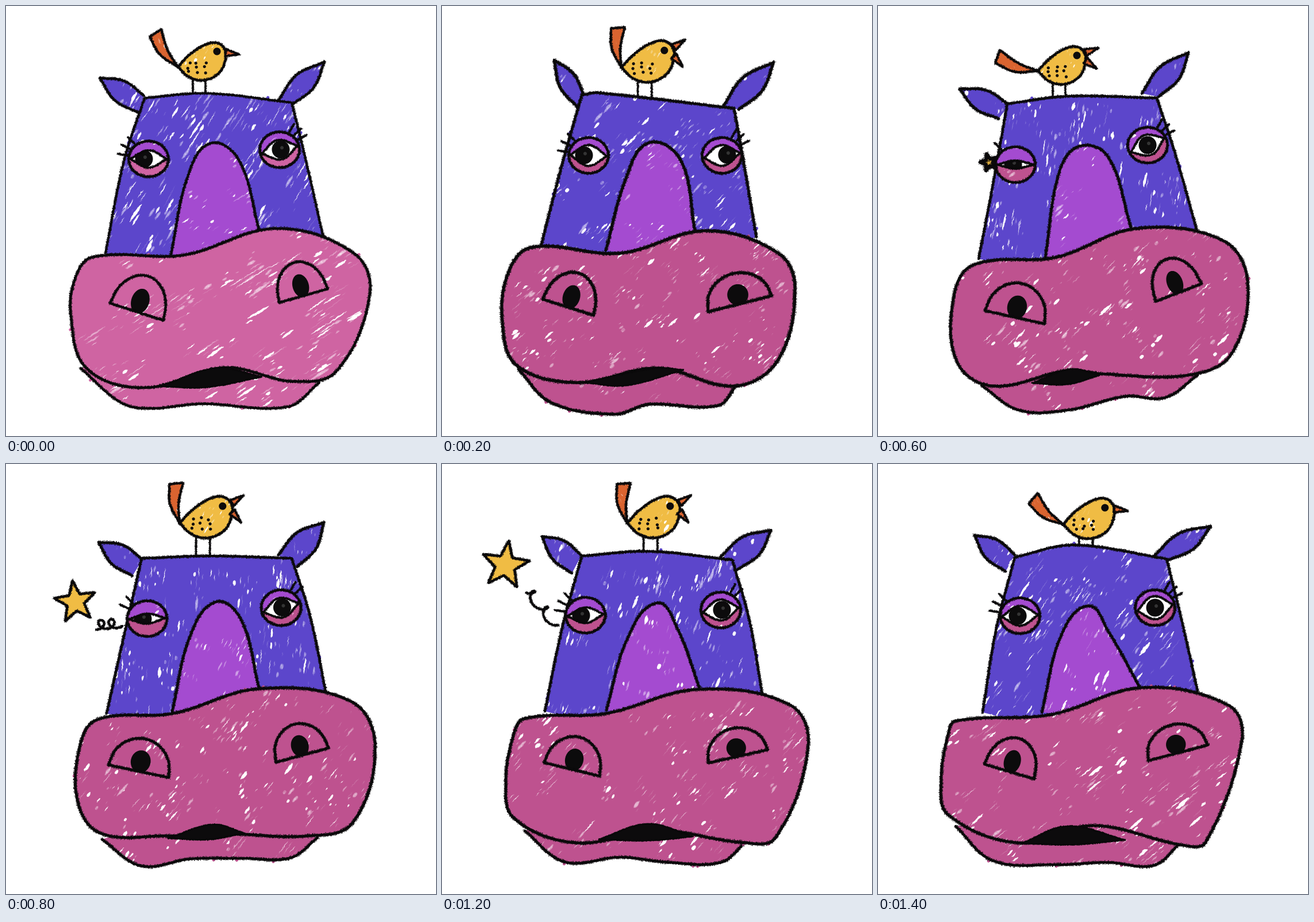
An HTML page with a canvas for the animation above (1.6 s loop, 748 by 748 pixels).

```html
<!DOCTYPE html>
<html lang="en">
<head>
<meta charset="utf-8">
<title>Crayon hippo</title>
<style>
html, body { margin: 0; width: 100%; height: 100%; overflow: hidden; background: #fff; }
canvas { display: block; width: 100vw; height: 100vh; }
</style>
</head>
<body>
<canvas id="stage" width="748" height="748"></canvas>
<script>
const SIZE = 748, STEP = 200, TAU = 2 * Math.PI, RAD = Math.PI / 180;
const INK = '#0c0b0c', BLUE = '#5c46cb', PURPLE = '#a44bd0', PINK = '#be528f';
const YELLOW = '#f0bc44', ORANGE = '#da6430';

// Outlines are key points of a smooth curve; a star marks a corner.
// ears: base, tip, base; nostrils: base ends, height
// eyes: centre, tilt, opening, look, lashes
// bird: tail root, scale, tail tip from root, gape in degrees
// angles: hatching of head, nose and muzzle
const calm = {
  pink: '#cf64a2', width: 5, angles: [-58, -35, -33], streak: 36,
  head: '173,430 205,270 241,160* 350,152 497,168* 522,270 556,420',
  nose: '287,432 315,300 355,239 405,268 440,388',
  muzzle: '150,437 310,433 470,387 605,430 633,500 575,635 500,653 380,629 240,664 140,630 113,540 120,475',
  jaw: '130,630 200,690 250,700 340,692 490,697 545,655',
  mouth: '270,662* 365,630 445,645* 350,663',
  ears: [[232, 186, 163, 125, 240, 156], [474, 164, 554, 97, 497, 172]],
  nostrils: [[181, 517, 274, 547, 65], [475, 516, 560, 492, 60]],
  eyes: [[248, 266, 0, 15, -8, 3], [476, 250, -12, 17, 2, 3]],
  bird: [299, 106, 1, -39, -59, 0]
};
const chirp = {
  width: 6, angles: [-48, -42, -42], streak: 20,
  head: '172,418 205,290 243,155* 270,151 508,178* 521,250 547,402',
  nose: '285,425 320,300 360,238 415,268 440,390',
  muzzle: '155,420 310,430 460,391 585,430 614,490 585,615 510,661 375,630 235,655 130,625 105,550 115,465',
  jaw: '133,632 190,690 300,710 360,693 480,695 512,660',
  mouth: '248,655* 370,630 420,633* 320,660',
  ears: [[238, 178, 195, 94, 247, 156], [489, 175, 577, 98, 516, 180]],
  nostrils: [[175, 510, 264, 538, 62], [463, 532, 574, 504, 54]],
  eyes: [[255, 260, 2, 18, -8, 3], [487, 260, -8, 18, 9, 3]],
  bird: [312, 107, 1.1, -6, -69, 42]
};
const wink = {
  width: 5.5, angles: [-80, -45, -45], streak: 22,
  head: '175,440 200,310 225,170* 330,157 485,160* 518,260 556,395',
  nose: '291,437 315,290 350,244 400,262 440,385',
  muzzle: '165,451 310,437 450,387 600,408 643,480 615,605 540,642 390,640 330,634 200,661 138,620 131,510',
  jaw: '180,660 245,703 330,703 430,679 500,681 556,642',
  mouth: '268,656* 335,632 386,642* 330,658',
  ears: [[210, 196, 142, 144, 228, 172], [459, 152, 540, 81, 488, 158]],
  nostrils: [[186, 530, 290, 553, 60], [483, 514, 563, 483, 62]],
  eyes: [[239, 276, 0, 7, -4, 1], [469, 242, -23, 18, 0, 3]],
  bird: [278, 113, 1, -70, -25, 28]
};
const fly = {
  width: 5.5, angles: [-88, -85, -58], streak: 20,
  head: '175,428 210,290 247,158* 380,163 508,168* 540,270 558,405',
  nose: '287,424 325,310 380,236 418,280 440,392',
  muzzle: '150,438 270,431 430,394 600,418 640,500 590,642 510,652 370,645 220,659 128,622 112,555 125,475',
  jaw: '153,645 225,694 310,671 390,692 490,688 528,658',
  mouth: '295,645* 385,622 442,642* 380,648',
  ears: [[230, 193, 180, 128, 247, 160], [488, 165, 566, 122, 525, 200]],
  nostrils: [[170, 517, 277, 538, 55], [456, 524, 560, 505, 49]],
  eyes: [[252, 262, -4, 10, -11, 3], [488, 258, -6, 16, 4, 0]],
  bird: [335, 117, .97, -39, -37, 33]
};
const rest = {
  width: 5.5, angles: [-55, -65, -40], streak: 28,
  head: '182,432 205,290 238,162* 340,141 502,165* 529,275 556,395',
  nose: '285,432 318,300 365,247 400,290 455,388',
  muzzle: '135,447 300,436 460,389 610,420 633,480 570,658 530,663 375,629 245,659 122,610 110,550 122,470',
  jaw: '135,630 200,690 310,697 400,693 480,698 525,660',
  mouth: '250,660* 330,630 430,654* 340,662',
  ears: [[222, 187, 168, 124, 238, 158], [480, 160, 579, 108, 502, 168]],
  nostrils: [[185, 522, 272, 548, 60], [470, 516, 574, 489, 50]],
  eyes: [[247, 264, -3, 17, -4, 3], [482, 250, -10, 20, 0, 3]],
  bird: [322, 105, 1.07, -52, -45, 0]
};

// Blends numbers, point strings, lists and whole poses.
function mix(a, b, t) {
  if (typeof a === 'number') return a + (b - a) * t;
  if (typeof a === 'string') {
    const nums = b.match(/\d+/g);
    let i = 0;
    return a.replace(/\d+/g, n => Math.round(mix(+n, +nums[i++], t)));
  }
  if (Array.isArray(a)) return a.map((v, i) => mix(v, b[i], t));
  return Object.fromEntries(Object.keys(a).map(k => [k, mix(a[k], b[k], t)]));
}
const hop = (a, b, dx) => {
  const pose = mix(a, b, .5), [, , ...shape] = chirp.bird;
  return { ...pose, bird: [chirp.bird[0] + dx, 103, ...shape] };
};

let g, seed;
function rnd() {
  seed = (seed + 0x6D2B79F5) | 0;
  let t = Math.imul(seed ^ (seed >>> 15), 1 | seed);
  t = (t + Math.imul(t ^ (t >>> 7), 61 | t)) ^ t;
  return ((t ^ (t >>> 14)) >>> 0) / 4294967296;
}

const parse = text => text.split(' ').map(s => [...s.replace('*', '').split(',').map(Number), s.endsWith('*')]);
const corner = p => [p[0], p[1], true];

// Local frame on a chord: u runs along it, v to its left, both in chord lengths.
const span = (ax, ay, bx, by) => (u, v) =>
  [ax + u * (bx - ax) + v * (by - ay), ay + u * (by - ay) - v * (bx - ax)];

// Turns key points into a dense polyline.
function curve(keys, closed) {
  if (typeof keys === 'string') keys = parse(keys);
  const p = keys.flatMap(k => k[2] ? [k, k] : [k]);
  const n = p.length, out = [];
  const at = i => closed ? p[(i + n) % n] : p[Math.max(0, Math.min(n - 1, i))];
  const dir = i => {
    const a = at(i - 1), b = at(i + 1), d = Math.hypot(b[0] - a[0], b[1] - a[1]) || 1;
    return [(b[0] - a[0]) / d, (b[1] - a[1]) / d];
  };
  for (let i = 0; i < (closed ? n : n - 1); i++) {
    const a = at(i), b = at(i + 1), len = Math.hypot(b[0] - a[0], b[1] - a[1]);
    if (!len) continue;
    const u = dir(i), v = dir(i + 1), k = len * 1.06, m = Math.ceil(len);
    for (let j = 0; j < m; j++) {
      const t = j / m, q = t * t, c = q * t;
      out.push([0, 1].map(d => (2 * c - 3 * q + 1) * a[d] + (c - 2 * q + t) * k * u[d] +
        (3 * q - 2 * c) * b[d] + (c - q) * k * v[d]));
    }
  }
  out.push(closed ? out[0] : p[n - 1]);
  return out;
}
function ring(cx, cy, rx, ry = rx, turn = 0) {
  const out = [], n = Math.ceil(TAU * Math.max(rx, ry)), c = Math.cos(turn), s = Math.sin(turn);
  for (let i = 0; i <= n; i++) {
    const x = rx * Math.cos(i / n * TAU), y = ry * Math.sin(i / n * TAU);
    out.push([cx + x * c - y * s, cy + x * s + y * c]);
  }
  return out;
}
function trace(pts) {
  g.beginPath();
  pts.forEach(p => g.lineTo(p[0], p[1]));
}
function fill(pts, color) {
  trace(pts);
  g.fillStyle = color;
  g.fill();
}
function inside(pts, draw) {
  g.save();
  trace(pts);
  g.clip();
  draw();
  g.restore();
}

// Wax line: solid core with a grainy rim.
function line(pts, w = 5) {
  trace(pts);
  g.strokeStyle = g.fillStyle = INK;
  g.lineWidth = w * .76;
  g.lineCap = g.lineJoin = 'round';
  g.stroke();
  for (const [x, y] of pts) for (let i = 0; i < 5; i++) {
    const a = rnd() * TAU, r = w * (.3 + rnd() * .36), s = .5 + rnd() * .8;
    g.fillRect(x + r * Math.cos(a) - s / 2, y + r * Math.sin(a) - s / 2, s, s);
  }
}

// Flat colour with bundles of uncoloured paper showing through.
function hatch(pts, color, deg, count, len) {
  fill(pts, color);
  const xs = pts.map(p => p[0]), ys = pts.map(p => p[1]);
  const x0 = Math.min(...xs), y0 = Math.min(...ys);
  const w = Math.max(...xs) - x0, h = Math.max(...ys) - y0;
  inside(pts, () => {
    g.strokeStyle = '#fff';
    g.lineCap = 'round';
    for (let i = 0; i < count; i++) {
      const cx = x0 + rnd() * w, cy = y0 + rnd() * h, n = 1 + 3 * rnd();
      for (let j = 0; j < n; j++) {
        const a = (deg + rnd() * 8 - 4) * RAD, c = Math.cos(a), s = Math.sin(a);
        const off = j * 7 - 8, along = (rnd() - .5) * len;
        const l = len * (.15 + 1.3 * rnd() * rnd()), wide = .8 + 5 * rnd() ** 3;
        const x = cx + along * c - off * s, y = cy + along * s + off * c;
        g.globalAlpha = rnd() < .5 ? .25 : .95;
        for (let d = 0; d < l; d += 2) {
          const e = (rnd() - .5) * 1.6;
          g.lineWidth = wide * (.3 + .7 * Math.sin(Math.PI * d / l)) * (.6 + .6 * rnd());
          g.beginPath();
          g.moveTo(x + d * c - e * s, y + d * s + e * c);
          g.lineTo(x + (d + 2) * c - e * s, y + (d + 2) * s + e * c);
          g.stroke();
        }
      }
    }
  });
}
// A few strokes that slip over the edge.
function slips(pts, color, deg, n) {
  const c = 4 * Math.cos(deg * RAD), s = 4 * Math.sin(deg * RAD);
  g.strokeStyle = color;
  g.lineWidth = 5;
  g.lineCap = 'round';
  while (n--) {
    const [x, y] = pts[Math.floor(rnd() * pts.length)];
    g.beginPath();
    g.moveTo(x - c, y - s);
    g.lineTo(x + c, y + s);
    g.stroke();
  }
}

function drawEar([ax, ay, tx, ty, bx, by], deg, len, w) {
  const up = span(ax, ay, tx, ty), back = span(tx, ty, bx, by);
  const ear = curve([up(0, 0), up(.5, .13), corner([tx, ty]), back(.5, .13), back(1, 0)]);
  hatch(ear, BLUE, deg, 6, len * .6);
  line(ear, w);
}
function drawNostril([ax, ay, bx, by, h], w) {
  const at = span(ax, ay, bx, by), len = Math.hypot(bx - ax, by - ay), keys = [];
  for (let i = 0; i <= 6; i++) {
    const a = i * Math.PI / 6;
    keys.push([...at(.5 - .5 * Math.cos(a), Math.sin(a) * h / len), i % 6 === 0]);
  }
  const rim = curve(keys, true);
  inside(rim, () => fill(ring(...at(.5, .3 * h / len), .16 * len, .34 * h, Math.atan2(by - ay, bx - ax)), INK));
  line(rim, w);
}
function drawEye([cx, cy, tilt, open, look, lashes], side, pink) {
  const dx = 32 * Math.cos(tilt * RAD), dy = 32 * Math.sin(tilt * RAD);
  const at = span(cx - dx, cy - dy, cx + dx, cy + dy), v = open / 64;
  const outer = ring(cx, cy, 34.5, 31);
  const lens = curve([corner(at(0, 0)), at(.5, v), corner(at(1, 0)), at(.5, -v)], true);
  const [px, py] = at(.5 + look / 64, 0);
  hatch(outer, PURPLE, -35, 3, 12);
  inside(outer, () => hatch([at(-.3, 0), at(1.3, 0), at(1.3, -1), at(-.3, -1)], pink, -35, 3, 10));
  fill(lens, '#fff');
  inside(lens, () => {
    fill(ring(px, py, 15.5), INK);
    fill(ring(px + 2, py - 3, 3), '#343434');
  });
  line(lens, 4);
  line(outer, 5);
  for (let i = 0; i < lashes; i++) {
    const a = (side ? 298 + 16 * i : 228 - 19 * i) * RAD, c = Math.cos(a), s = Math.sin(a);
    line(curve([[cx + 36 * c, cy + 35 * s], [cx + 54 * c, cy + 51 * s]]), 4);
  }
}

function drawLegs([x, y, k]) {
  for (const d of [26, 48]) line(curve([[x + d * k, y + 18], [x + d * k, y + 60]]), 3.5);
}
function drawBird([x, y, k, tx, ty, gape]) {
  const at = (u, v) => [x + u * k, y + v * k];
  const tail = span(x, y, x + tx, y + ty), half = 12 / Math.hypot(tx, ty);
  const fan = curve([corner([x, y]), tail(.5, .2), corner(tail(1, half)), corner(tail(1, -half)), tail(.5, -.02)], true);
  hatch(fan, ORANGE, 60, 3, 9);
  line(fan, 4.5);
  const body = curve(parse('0,0* 20,-21 46,-38 68,-42 82,-30 82,-10 71,11 46,23 20,18')
    .map(p => [...at(p[0], p[1]), p[2]]), true);
  hatch(body, YELLOW, -60, 6, 12);
  for (let i = 0; i < 9; i++)
    fill(ring(...at(17 + 14 * (i % 3) + 5 * rnd(), -9 + 8 * Math.floor(i / 3) + 4 * rnd()), 2.6), INK);
  line(body, 5);
  for (const s of gape ? [-1, 1] : [0]) {
    const [bx, by] = at(83, -25 + 7 * s), a = (8 + gape * s) * RAD;
    const beak = span(bx, by, bx + 24 * Math.cos(a), by + 24 * Math.sin(a));
    const tip = curve([[0, .25], [1, 0], [0, -.25]].map(p => corner(beak(...p))), true);
    fill(tip, ORANGE);
    line(tip, 4);
  }
  fill(ring(...at(68, -27), 6.5), INK);
}

// The star pops out of the eye and slows down as it climbs; k counts its steps.
function drawStar(k) {
  const cx = 110 + 83 * .13 ** k, cy = 272 - 32 * k, r = 43 * (1 - .65 * .2 ** k);
  const keys = [];
  for (let i = 0; i < 10; i++) {
    const a = (i * 36 + 8 * (k - 2) - 90) * RAD, d = i % 2 ? r * .42 : r;
    keys.push(corner([cx + d * Math.cos(a), cy + d * Math.sin(a)]));
  }
  if (k) {
    const at = span(cx + 36, cy + 48, 196, 285), curl = [];
    for (let t = 0; t <= 1; t += .02) {
      const [x, y] = at(t, 0), a = 2.2 * TAU * t;
      curl.push([x + 9 * Math.sin(a), y - 8 + 8 * Math.cos(a)]);
    }
    line(curve(curl), 4.5);
  }
  const star = curve(keys, true);
  fill(star, YELLOW);
  line(star, k ? 5 : 8);
}

function paint([p, star], i) {
  const page = document.createElement('canvas');
  page.width = page.height = SIZE;
  g = page.getContext('2d');
  seed = 71 + i * 997;
  g.fillStyle = '#fff';
  g.fillRect(0, 0, SIZE, SIZE);
  const w = p.width, len = p.streak, pink = p.pink || PINK, [ha, na, ma] = p.angles;

  const jaw = curve(p.jaw), head = curve(p.head), nose = curve(p.nose);
  const muzzle = curve(p.muzzle, true), mouth = curve(p.mouth, true);
  hatch([...jaw, [330, 600]], pink, ma, 24, len);
  slips(jaw, pink, ma, 3);
  line(jaw, w);
  drawLegs(p.bird);
  p.ears.forEach(e => drawEar(e, ha, len, w));
  hatch([...head, [330, 470]], BLUE, ha, 120, len);
  slips(head, BLUE, ha, 3);
  line(head, w - .5);
  hatch([...nose, [370, 440]], PURPLE, na, 18, len * .7);
  line(nose, w);
  hatch(muzzle, pink, ma, 90, len);
  slips(muzzle, pink, ma, 5);
  line(muzzle, w + .5);
  fill(mouth, INK);
  line(mouth, 2.5);
  p.nostrils.forEach(n => drawNostril(n, w));
  p.eyes.forEach((e, side) => drawEye(e, side, pink));
  drawBird(p.bird);
  if (star !== undefined) drawStar(star);
  return page;
}

const [calmPage, ...pages] = [
  [calm], [chirp], [wink, 0], [hop(wink, fly, -10), 1], [fly, 2], [hop(fly, rest, 10), 3], [rest]
].map(paint);
const reel = [calmPage, pages[0], calmPage, ...pages.slice(1)];
const stage = document.getElementById('stage').getContext('2d');
const start = performance.now();
let shown = -1;
function tick() {
  const i = Math.floor((performance.now() - start) / STEP) % reel.length;
  if (i !== shown) stage.drawImage(reel[shown = i], 0, 0);
  requestAnimationFrame(tick);
}
tick();
</script>
</body>
</html>
```
